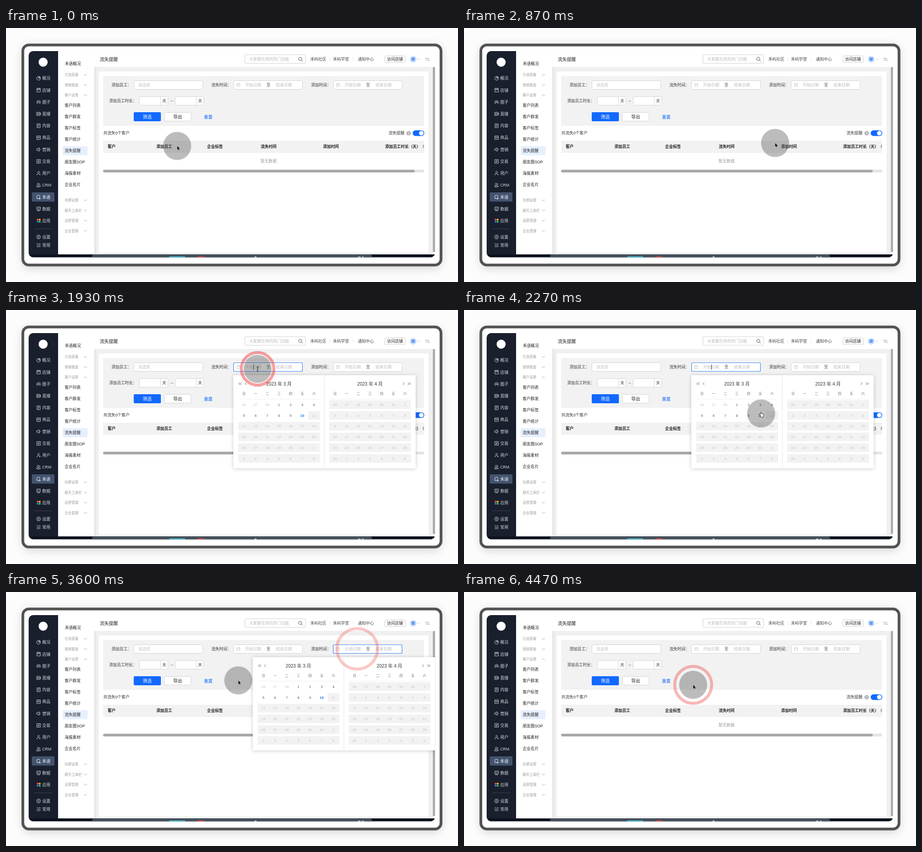
An HTML page for the animation above (4530 ms loop, 998 px wide and 561 px high).

```html
<!DOCTYPE html>
<html lang="zh-CN">
<head>
<meta charset="utf-8">
<title>流失提醒</title>
<style>
  html, body { margin: 0; width: 100%; height: 100%; overflow: hidden; background: #fff; }
  svg { display: block; }
  text { font-family: "Liberation Sans", "Noto Sans CJK SC", "Noto Sans CJK JP", sans-serif; white-space: pre; }

  .cal, .focus, .caret, .tip, #cursor, #rings { animation: 4530ms linear infinite; }
  .cal { transform-origin: 0 144px; opacity: 0; }
  #cal1 { animation-name: cal1; }
  #cal2 { animation-name: cal2; }
  .focus, .caret, .tip, #rings { animation-timing-function: step-end; }
  #focus1 { animation-name: focus1; }
  #focus2 { animation-name: focus2; }
  .caret { animation-name: caret; }
  #arrow { animation-name: arrow; }
  #beam { animation-name: beam; }
  #hand { animation-name: hand; }
  #cursor { animation-name: move; }
  #rings { animation-name: gate; }
  .ring { fill: none; stroke: #ee2a2a; stroke-width: 6.5; opacity: 0; animation: ring 4530ms linear infinite; }

  @keyframes cal1 {
    0% { transform: scaleY(0); opacity: 0; }
    31.57% { transform: scaleY(0); opacity: 0; animation-timing-function: cubic-bezier(.23,1,.32,1); }
    37.31% { transform: none; opacity: 1; }
    59.8% { transform: none; opacity: 1; animation-timing-function: cubic-bezier(.23,1,.32,1); }
    65.3%, 100% { transform: scaleY(0); opacity: 0; }
  }
  @keyframes cal2 {
    0% { transform: scaleY(0); opacity: 0; }
    59.8% { transform: scaleY(0); opacity: 0; animation-timing-function: cubic-bezier(.23,1,.32,1); }
    65.3% { transform: none; opacity: 1; }
    86.4% { transform: none; opacity: 1; animation-timing-function: cubic-bezier(.23,1,.32,1); }
    92.05%, 100% { transform: scaleY(0); opacity: 0; }
  }
  @keyframes focus1 { 0%, 59.8%, 100% { opacity: 0; } 31.57% { opacity: 1; } }
  @keyframes focus2 { 0%, 86.4%, 100% { opacity: 0; } 59.8% { opacity: 1; } }
  @keyframes caret { 0%, 42.8%, 53.9%, 100% { opacity: 0; } 37.3%, 48.3% { opacity: 1; } }
  @keyframes arrow { 0%, 69.3%, 100% { opacity: 1; } 23.2% { opacity: 0; } }
  @keyframes beam { 0%, 45.7%, 69.3%, 100% { opacity: 0; } 23.2%, 58.3% { opacity: 1; } }
  @keyframes hand { 0%, 58.3%, 100% { opacity: 0; } 45.7% { opacity: 1; } }
  @keyframes gate { 0% { opacity: 0; } 8%, 100% { opacity: 1; } }
  @keyframes ring {
    0% { r: 0; opacity: 1; }
    .9% { r: 0; }
    3.7% { opacity: 1; }
    16.78% { r: 56.8px; opacity: 0; }
    100% { r: 56.8px; opacity: 0; }
  }
  @keyframes move {
    0% { transform: translate(378px, 260.5px); }
    4% { transform: translate(378px, 260.5px); animation-timing-function: ease-in-out; }
    13.25%, 18.8% { transform: translate(692px, 258px); }
    19.2% { transform: translate(687.5px, 254.5px); animation-timing-function: cubic-bezier(.3,.3,.5,1); }
    24.94%, 27.9% { transform: translate(562px, 133px); }
    29.36% { transform: translate(555.5px, 130px); }
    44% { transform: translate(555.5px, 130px); animation-timing-function: cubic-bezier(.4,0,.4,1); }
    50.1% { transform: translate(656px, 228.5px); }
    51.4% { transform: translate(657px, 231px); }
    56.5% { transform: translate(657px, 231px); animation-timing-function: ease-in-out; }
    59.9% { transform: translate(780px, 121px); }
    64.9% { transform: translate(775.5px, 125.5px); }
    68.6% { transform: translate(775.5px, 125.5px); animation-timing-function: cubic-bezier(.4,0,.4,1); }
    79.4% { transform: translate(513px, 195px); }
    83.9%, 100% { transform: translate(506px, 205px); }
  }
</style>
</head>
<body>
<script>
const BLUE = '#1269ff';

const text = (x, y, s, size = 8.8, fill = '#333', extra = '') =>
  `<text x="${x}" y="${(y + size * .37).toFixed(2)}" font-size="${size}" fill="${fill}" ${extra}>${s}</text>`;
const mid = (x, y, s, size, fill, extra = '') => text(x, y, s, size, fill, `text-anchor="middle" ${extra}`);
const rect = (x, y, w, h, fill, rx = 0, extra = '') =>
  `<rect x="${x}" y="${y}" width="${w}" height="${h}" fill="${fill}" rx="${rx}" ${extra}/>`;
const box = (x, y, w, h, stroke = '#d3d3d3') => rect(x, y, w, h, '#fff', 2, `stroke="${stroke}"`);
const dot = (x, y, r, fill) => `<circle cx="${x}" cy="${y}" r="${r}" fill="${fill}"/>`;
const line = (d, stroke, w = 1) => `<path d="${d}" fill="none" stroke="${stroke}" stroke-width="${w}"/>`;
const chev = (x, y, dir = 1) => line(`M${x - 3} ${y - 1.5 * dir}l3 ${3 * dir} 3 ${-3 * dir}`, '#999', .9);
const info = (x, y) => dot(x, y, 5, '#b4b7bd') + mid(x, y, 'i', 7, '#fff', 'font-weight="600"');

function device() {
  return rect(0, 0, 998, 561, '#fcfcfc', 20) +
    rect(37, 40, 924, 490, '#000', 14, 'opacity=".16" filter="url(#soft)"') +
    rect(37.2, 37.5, 923.3, 486, '#fff', 13, 'stroke="#525252" stroke-width="6"');
}

// Icons are drawn in a 10 x 10 box.
const menu = [
  ['概况', 'M5 .8A4.2 4.2 0 1 0 9.2 5H5ZM6.5 .8A4 4 0 0 1 9.2 3.5H6.5Z'],
  ['店铺', 'M1 4.5V9H9V4.5M1 1H9V4H1ZM3.6 1V4M6.4 1V4'],
  ['圈子', 'M5 1.5a1.7 1.7 0 1 0 .01 0M2.2 9a2.8 3.4 0 0 1 5.6 0M2.2 2Q0 3.5 2 5Q.3 5.8 .2 7.5M7.8 2Q10 3.5 8 5Q9.7 5.8 9.8 7.5'],
  ['直播', 'M.8 1.5H7V8.5H.8ZM7 4L9.4 2.5V7.5L7 6M3 3.5V6.5L5.2 5Z'],
  ['内容', 'M1.5 .8H8.5V9.2H1.5ZM3.3 3H6.7M3.3 5H6.7M3.3 7H5'],
  ['商品', 'M1 1.2H9V9H1ZM1 4H9M3.5 5.8H6.5'],
  ['营销', 'M.8 3.3H3L6.2 1V9L3 6.7H.8ZM7.8 3Q9.5 5 7.8 7'],
  ['交易', 'M1 1H9V9H1ZM3 4H7L5.5 2.7M7 6H3L4.5 7.3'],
  ['用户', 'M5 .8a2 2 0 1 0 .01 0M1 9.2Q1 5.7 5 5.7M6 7.5H9.2M7.7 6V9'],
  ['CRM', 'M4 .8a2 2 0 1 0 .01 0M.8 9V7Q4 4.4 7 7V9ZM7 1.2Q9 2.5 7.4 4.4M8 5.8Q9.4 7 9.3 9'],
  ['禾语', 'M4.5 8.6A3.8 3.8 0 1 1 8.3 4.6M2.5 7.5L1.5 9.3M7 5.8L5.2 9.2H9Z'],
  ['数据', 'M1 1H9V7.2H1ZM2 9.2H8M2.5 5L4.3 3.4 5.8 4.8 7.6 2.8'],
  ['应用', '']
];

function icon(x, y, d, color) {
  return `<g transform="translate(${x - 5} ${y - 5})">${line(d, color, .95)}</g>`;
}

function sidebar() {
  const ink = '#d6d9e0';
  let s = rect(50, 51, 65, 450, '#191f2d') + dot(82, 75.5, 10, '#fff') + rect(57, 363, 50, 20.5, '#43536f', 2);
  menu.forEach(([name, d], i) => {
    const y = 111 + i * 26.23;
    s += icon(72, y, d, i == 10 ? '#fff' : ink) + text(80, y, name, i == 9 ? 8.8 : 9, i == 10 ? '#fff' : ink);
  });
  ['#f5533d', '#ffb92e', '#2f7bff', '#2fc66b'].forEach((c, i) =>
    s += dot(69.8 + i % 2 * 4.6, 423.3 + (i >> 1) * 4.6, 2.1, c));
  s += line('M62 443.5H102', '#3a4151') +
    icon(72, 461.5, 'M2.7 1H7.3L9.6 5 7.3 9H2.7L.4 5ZM5 3.3a1.7 1.7 0 1 0 .01 0', ink) + text(80, 461.5, '设置', 9, ink) +
    icon(72, 479.5, 'M.8 1.3L2 2.5 3.5 .8M5 2H9.3M.8 5.2H9.3M.8 8.4H9.3', ink) + text(80, 479.5, '常用', 9, ink);
  return s;
}

function subnav() {
  let s = rect(125, 261, 55, 20, '#e6efff', 2) + text(130, 78.5, '禾语概况', 8.8, '#222');
  [['引流获客', 103.5], ['营销裂变', 126], ['客户运营', 148.5, -1], ['社群运营', 380.5], ['聊天工具栏', 403],
   ['运营管理', 425.5], ['企业管理', 448]].forEach(([t, y, dir]) => s += text(129.5, y, t, 7.6, '#999') + chev(175.5, y, dir));
  ['客户列表', '客户群发', '客户标签', '客户统计', '流失提醒', '朋友圈SOP', '海报素材', '企业名片']
    .forEach((t, i) => s += text(129.5, 171 + i * 25, t, 8.8, '#222'));
  return s;
}

function header() {
  return text(207, 69, '流失提醒', 10, '#222', 'font-weight="500"') +
    box(527.5, 59, 134, 19, '#cfcfcf') + text(537, 69, '大家都在用的热门功能', 8.8, '#bbb') +
    line('M649.7 64.6a3.5 3.5 0 1 0 .01 0M652.3 70.8L655 73.5', '#444', 1) +
    text(672, 69, '禾屿社区', 8.8, '#444') + text(722, 69, '禾屿学堂', 8.8, '#444') + text(777, 69, '通知中心', 8.8, '#444') +
    line('M715.5 65V73M766.5 65V73', '#ddd', .8) +
    box(836.5, 61.5, 45, 14.5, '#ccc') + text(841.2, 69, '访问店铺', 8.8, '#222') +
    dot(899, 69, 7.5, '#cfe0fb') + rect(895, 65.5, 8, 3, '#4d8df5', 1) + rect(895.6, 69.3, 6.8, 3, '#4d8df5', .6) +
    line('M910 68l2.2 2.2 2.2-2.2', '#aaa', .8) +
    line('M935 67.3H926.3L928.8 65M926.3 70.7H935L932.5 73', '#888', .8);
}

function range(x, label, lx) {
  const c = x + 11;
  return text(lx, 126, label) + box(x + .5, 116.5, 152, 19) +
    line(`M${c - 3.5} 123H${c + 3.5}V129.5H${c - 3.5}ZM${c - 3.5} 125.5H${c + 3.5}M${c - 1.7} 121.5V124M${c + 1.7} 121.5V124`, '#c4c4c4', .8) +
    text(x + 26, 126, '开始日期', 8.8, '#bbb') + text(x + 73, 126, '至', 8.8, '#555') + text(x + 94, 126, '结束日期', 8.8, '#bbb');
}
const days = x => box(x + .5, 151.5, 63, 19) + line(`M${x + 47} 151.5V170.5`, '#d3d3d3') + mid(x + 55.5, 161, '天', 8.8, '#333');

function content() {
  let s = rect(195, 86, 748, 415, '#f0f0f0') + rect(195, 86, 6, 415, 'url(#edge)') + rect(205, 96, 728, 400, '#fff') +
    rect(214.5, 106, 708.5, 110, '#f2f2f2') +
    text(233, 126, '添加员工：') + box(282.5, 116.5, 152, 19) + text(292, 126, '请选择', 8.8, '#c2c2c2') +
    range(502, '流失时间：', 453.5) + range(722, '添加时间：', 673.5) +
    text(228, 161, '添加员工时长：', 8.6) + days(294) + mid(366, 161, '–', 9, '#333') + days(373) +
    rect(282, 186, 60, 20, BLUE, 2) + mid(312, 196, '筛选', 9.8, '#fff') +
    box(349.5, 186.5, 59, 19) + mid(379, 196, '导出', 9.8, '#222') + text(437, 196, '重置', 9.6, BLUE) +
    text(215, 232, '共流失0个客户') + text(844.5, 232, '流失提醒') + info(889, 232.5) +
    rect(898, 226, 25.5, 12.5, BLUE, 6.2) + dot(917, 232.2, 5, '#fff') +
    rect(214.5, 249, 708.5, 27, '#f2f2f2') +
    `<g clip-path="url(#table)">${info(924.5, 261.5)}</g>`;
  [['客户', 224.5], ['添加员工', 332], ['企业标签', 444], ['流失时间', 562.5], ['添加时间', 700], ['添加员工时长（天）', 837]]
    .forEach(([t, x]) => s += text(x, 262, t, 8.7, '#222', 'font-weight="600"'));
  return s + text(562, 294, '暂无数据', 8.8, '#999') +
    rect(214.5, 313, 708.5, 6, '#e4e4e4') + rect(214.5, 313, 688, 6, '#a9a9a9', 3) +
    rect(942.5, 86, 5, 409, '#a9a9a9', 2);
}

function desktop() {
  return rect(50, 500, 898, 7, '#0c121d') + rect(190, 500.5, 618, 12, '#47525f', 4) +
    rect(360, 504.5, 36, 6, '#49c3d6', 2) + rect(422, 504.5, 17, 6, '#dc4a45', 3) +
    dot(551, 507, 2.5, '#e8e8e8') + rect(777, 505, 6, 3, '#e0e0e0', 1) + rect(786, 505, 4, 3, '#e0e0e0', 1);
}

// One month: lead = days shown from the month before, len = days in the month.
function month(x, title, lead, len, lastPrev, today) {
  const step = 25.75;
  let s = mid(x + 90, 163, title, 10, '#333');
  [...'日一二三四五六'].forEach((d, c) => s += mid(x + 12.7 + c * step, 184, d, 7.4, '#666'));
  s += line(`M${x} 197H${x + 180.5}`, '#ebebeb', .8);
  for (let r = 0; r < 6; r++) {
    const y = 209 + r * 23.75;
    const from = Math.max(0, lead + today - r * 7);
    if (from < 7) s += rect(x + from * step, y - 9.5, 180.5 - from * step, 19, '#f2f2f2');
    for (let c = 0; c < 7; c++) {
      const n = r * 7 + c, d = n - lead + 1;
      const day = d < 1 ? lastPrev + d : d > len ? d - len : d;
      const now = d == today, open = d > 0 && d <= today;
      s += mid(x + 12.7 + c * step, y, day, 7.8, now ? BLUE : open ? '#555' : '#c3c3c3', now ? 'font-weight="700"' : '');
    }
  }
  return s;
}

function calendar(id, x) {
  const arrow = (ax, dir) => line(`M${ax + 1.5 * dir} 160l${-2.6 * dir} 2.8 ${2.6 * dir} 2.8`, '#555', .9);
  return `<g class="cal" id="${id}">` +
    rect(x, 144, 402.5, 205.7, '#fff', 2, 'style="filter:drop-shadow(0 1px 4px rgba(0,0,0,.2))"') +
    line(`M${x + 201} 144V349.7`, '#e6e6e6') +
    arrow(x + 13, 1) + arrow(x + 16.3, 1) + arrow(x + 27, 1) +
    arrow(x + 376, -1) + arrow(x + 387, -1) + arrow(x + 390.3, -1) +
    month(x + 10.7, '2023 年 3 月', 3, 31, 28, 10) +
    month(x + 211.7, '2023 年 4 月', 6, 30, 31, -6) + '</g>';
}

const focus = (id, x) => `<rect class="focus" id="${id}" x="${x}" y="116.5" width="152" height="19" rx="2" fill="none" stroke="#3d86f0" stroke-width="1.2"/>`;
const ring = (x, y, ms) => `<circle class="ring" cx="${x}" cy="${y}" r="0" style="animation-delay:${ms}ms"/>`;

function pointer() {
  const ink = 'stroke-linejoin="round"';
  return `<g id="cursor"><circle r="31" fill="#505050" fill-opacity=".38"/>
    <path class="tip" id="arrow" d="M.3 .3V8.3L2.1 6.7 3.4 9.5 4.7 8.9 3.4 6.2H5.8Z" fill="#000" stroke="#fff" stroke-width=".6" paint-order="stroke" ${ink}/>
    <path class="tip" id="beam" d="M-2-4.5Q0-4.5 0-3V4Q0 5.5-2 5.5M2-4.5Q0-4.5 0-3M0 4Q0 5.5 2 5.5M-1 1H1" fill="none" stroke="#111" stroke-width=".9"/>
    <path class="tip" id="hand" d="M-1 6V4.5L-4 1.8Q-3.5 .4-1.3 2V-1.8Q-.4-3 .5-1.8V1Q1.5 .2 2.1 1.4 3.2 .8 3.7 2 5 1.6 5.1 3L4.3 7.2V9H-.2V7.5Z" transform="translate(0 -.5)" fill="#fff" stroke="#111" stroke-width=".8" ${ink}/>
  </g>`;
}

document.body.innerHTML = `<svg width="998" height="561" viewBox="0 0 998 561">
  <defs>
    <filter id="soft" x="-10%" y="-10%" width="120%" height="125%"><feGaussianBlur stdDeviation="11"/></filter>
    <linearGradient id="edge"><stop stop-color="#e2e2e2"/><stop offset="1" stop-color="#f0f0f0"/></linearGradient>
    <clipPath id="screen"><rect x="50" y="51" width="897.5" height="455.5" rx="10"/></clipPath>
    <clipPath id="table"><rect x="214" y="249" width="709" height="27"/></clipPath>
  </defs>
  ${device()}
  <g clip-path="url(#screen)">
    ${rect(50, 51, 898, 456, '#fff')}${content()}${sidebar()}${subnav()}${header()}${desktop()}
    ${focus('focus1', 502.5)}${focus('focus2', 722.5)}
    <path class="caret" d="M546.5 120.5V132" stroke="#222" stroke-width=".9"/>
    ${calendar('cal1', 502)}${calendar('cal2', 545)}
    ${pointer()}
    <g id="rings">${ring(555.5, 130, 1435)}${ring(780, 120.5, 2709)}${ring(775.5, 125.5, 2992)}${ring(506, 205, 3913)}</g>
  </g>
</svg>`;
</script>
</body>
</html>
```
